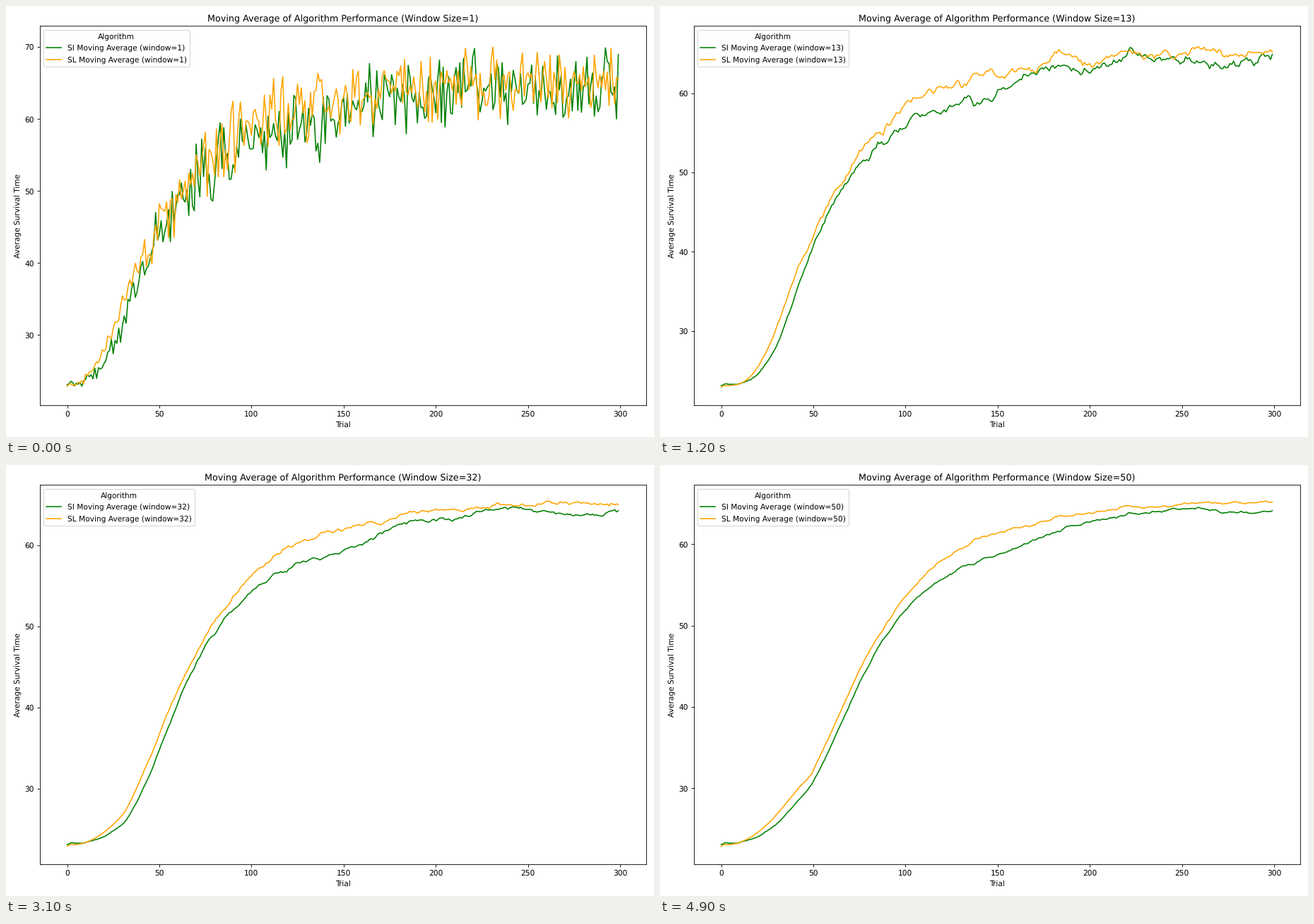
A matplotlib script that plays this animation: 917 by 611 pixels, repeating every 5 s.

```python
import numpy as np
import matplotlib.pyplot as plt
from matplotlib.animation import FuncAnimation

WIDTH, HEIGHT, DPI = 917, 611, 76.4
TRIALS, WINDOWS = 300, 50
trials = np.arange(TRIALS)

# Learning curves: underlying survival time at a few key trials
KEY_TRIALS = [0, 8, 17, 27, 37, 50, 70, 85, 100, 120,
              140, 160, 180, 195, 210, 235, 260, 280, 299]
SI_TREND = [23.2, 23.4, 25.0, 29.4, 36.5, 44.4, 51.4, 54.8, 57.0, 58.4,
            59.2, 62.4, 63.3, 62.4, 64.8, 64.5, 63.5, 64.0, 65.2]
SL_TREND = [22.9, 23.5, 26.2, 32.4, 38.6, 45.2, 52.9, 56.2, 59.9, 60.9,
            62.8, 62.4, 65.6, 63.2, 65.2, 64.8, 65.5, 64.6, 65.9]

plt.rcParams["text.hinting"] = "none"


def make_series(trend, seed):
    """Trend plus noise that grows with skill and averages out locally."""
    noise = np.random.default_rng(seed).normal(size=TRIALS)
    noise -= np.convolve(noise, np.ones(15) / 15, "same")
    spread = np.interp(trials, [0, 15, 30, 60], [0.15, 0.4, 1.0, 2.7])
    return np.interp(trials, KEY_TRIALS, trend) + spread * np.clip(noise, -1.9, 1.9)


def moving_average(values, window):
    sums = np.concatenate([[0], np.cumsum(values)])
    start = np.maximum(trials + 1 - window, 0)
    return (sums[trials + 1] - sums[start]) / (trials + 1 - start)


def view_limits(window):
    """Padded y range; the top sinks as averaging flattens the peaks."""
    low = 22.6 if window == 1 else 22.75
    high = np.interp(window, [1, 5, 13, 28, 50], [70.5, 68, 66.3, 65.3, 65.15])
    pad = 0.05 * (high - low)
    return low - pad, high + pad


series = {
    "SI": ("green", make_series(SI_TREND, 4)),
    "SL": ("orange", make_series(SL_TREND, 11)),
}

fig = plt.figure(figsize=((WIDTH + 1e-6) / DPI, (HEIGHT + 1e-6) / DPI), dpi=DPI)
ax = fig.add_axes([47.5 / WIDTH, 1 - 566.5 / HEIGHT, 858 / WIDTH, 538 / HEIGHT])
lines = [ax.plot(trials, values, color=color, label=name)[0]
         for name, (color, values) in series.items()]
ax.set_xlabel("Trial")
ax.set_ylabel("Average Survival Time")
margin = 0.05 * (TRIALS - 1)
ax.set_xlim(-margin, TRIALS - 1 + margin)
title = ax.set_title("")
legend = ax.legend(title="Algorithm", loc="upper left", labelspacing=0.56)


def update(frame):
    window = frame + 1
    for line, text, (name, (_, values)) in zip(
            lines, legend.get_texts(), series.items()):
        line.set_ydata(moving_average(values, window))
        text.set_text(f"{name} Moving Average (window={window})")
    ax.set_ylim(*view_limits(window))
    title.set_text(
        f"Moving Average of Algorithm Performance (Window Size={window})")
    return [*lines, title, legend]


anim = FuncAnimation(fig, update, frames=WINDOWS, interval=100, repeat=True)
plt.show()
```
